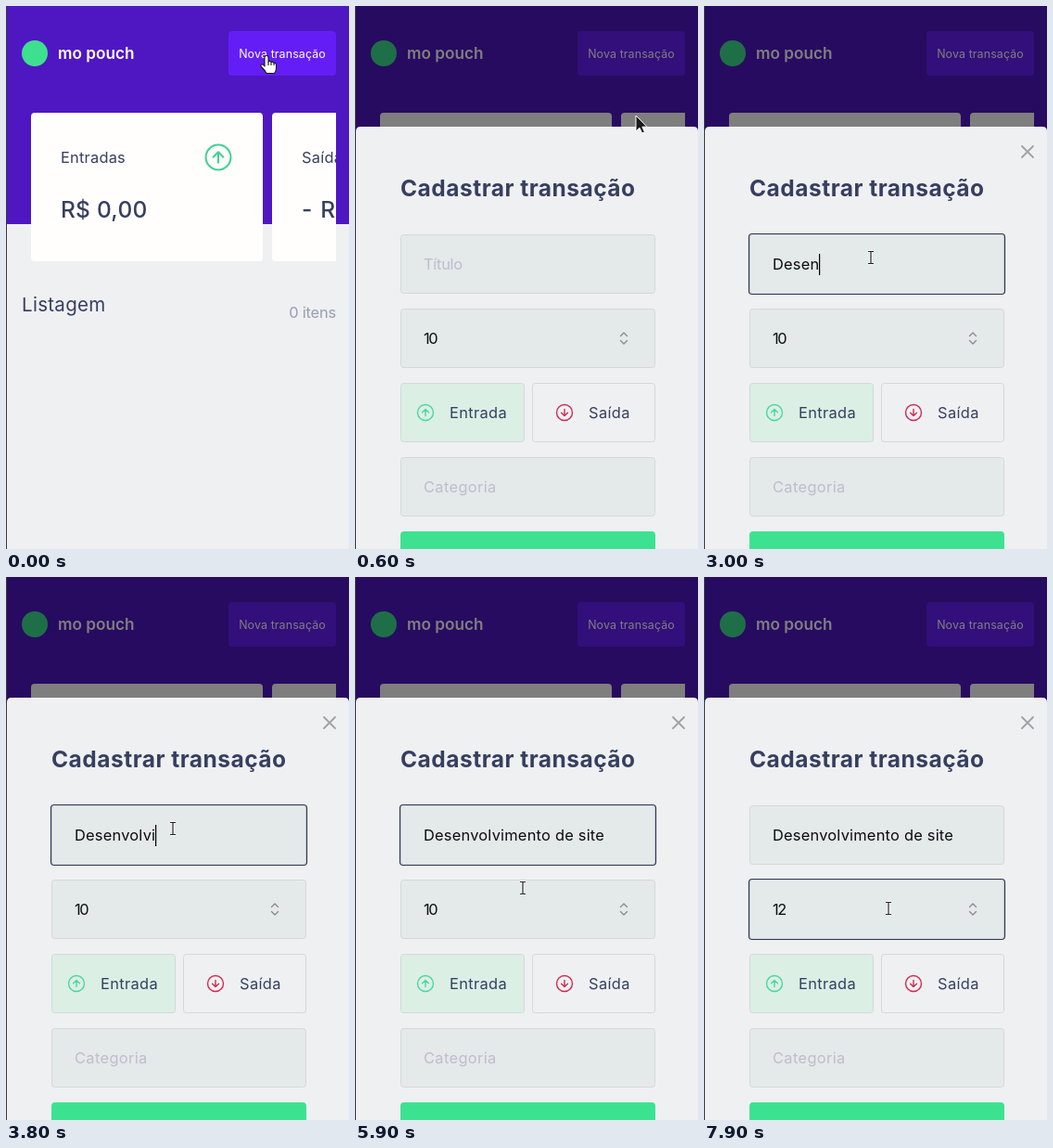
Animation, 370 px wide and 585 px high, one loop 8 s. Source, as an HTML page:

```html
<!DOCTYPE html>
<html lang="pt">
<head>
<meta charset="utf-8">
<title>Nova transação</title>
<style>
  html, body { margin: 0; width: 100%; height: 100%; overflow: hidden; background: #eff0f2; }
  svg { display: block; }
  text { font: 16.4px Inter, "Open Sans", sans-serif; letter-spacing: .014em; fill: #363f5f; white-space: pre; }
  .brand { font-size: 17.2px; font-weight: 600; letter-spacing: 0; fill: #fff; }
  .action { font-size: 12.4px; letter-spacing: .01em; fill: #fff; }
  .amount { font-size: 24.5px; font-weight: 500; letter-spacing: .01em; }
  .heading { font-size: 20.5px; letter-spacing: .014em; }
  .title { font-size: 24.5px; font-weight: 700; letter-spacing: .02em; }
  .option { letter-spacing: .022em; }
  .count { fill: #969cb2; letter-spacing: -.01em; }
  .hint { fill: #bdbdcd; }
  .entry { fill: #0c0c10; }
  #hint { letter-spacing: -.015em; }
  #number { letter-spacing: -.09em; }
  .field { fill: #e4e9ea; stroke: #d4d8d9; }
  .focus { fill: none; stroke: #2f3857; stroke-width: 1.2; }
  .line { fill: none; stroke-linecap: round; stroke-linejoin: round; }
</style>
</head>
<body>
<svg width="370" height="585" viewBox="0 0 370 585">
  <defs>
    <clipPath id="row"><path d="M0 100H356V290H0z"/></clipPath>
    <g id="up" class="line"><circle r="8.5"/><path d="M0 3.6V-3.6M-3.4-.2 0-3.6 3.4-.2"/></g>
  </defs>

  <path fill="#eff0f2" d="M0 0H370V585H0z"/>
  <path fill="#4f17c2" d="M0 0H370V235H0z"/>
  <circle cx="31" cy="51" r="14" fill="#3de08f"/>
  <text class="brand" x="56" y="57">mo pouch</text>
  <rect x="240" y="27" width="116" height="48" rx="4" fill="#641ef5"/>
  <text class="action" x="298" y="56" text-anchor="middle">Nova transação</text>
  <rect id="shade" x="240" y="27" width="116" height="48" rx="4" fill="#200080"/>

  <g clip-path="url(#row)">
    <rect x="27" y="115" width="250" height="160" rx="4" fill="#fffefd"/>
    <rect x="287" y="115" width="250" height="160" rx="4" fill="#fffefd"/>
    <text x="59" y="169">Entradas</text>
    <text x="319" y="169">Saídas</text>
    <text class="amount" x="59" y="228">R$ 0,00</text>
    <text class="amount" x="319" y="228" word-spacing="2">- R$ 0,00</text>
    <use href="#up" transform="translate(229 163) scale(1.58)" stroke="#44cf97" stroke-width="1.3"/>
  </g>
  <text class="heading" x="17" y="329">Listagem</text>
  <text class="count" x="356" y="336" text-anchor="end">0 itens</text>

  <g id="modal">
    <path fill="#000" opacity=".5" d="M0 0H370V585H0z"/>
    <path fill="#eff0f2" d="M1 585V135q0-5 5-5H365q5 0 5 5V585z"/>
    <path id="close" class="line" d="M343 151l12 12m0-12l-12 12" stroke="#a0a1a6" stroke-width="1.8"/>
    <text class="title" x="49" y="205">Cadastrar transação</text>

    <rect class="field" x="49.5" y="246.5" width="274" height="63" rx="3"/>
    <rect class="field" x="49.5" y="326.5" width="274" height="63" rx="3"/>
    <rect class="field" x="49.5" y="406.5" width="133" height="63" rx="3" style="fill:#dbefe5"/>
    <rect class="field" x="191.5" y="406.5" width="132" height="63" rx="3" style="fill:none"/>
    <rect class="field" x="49.5" y="486.5" width="274" height="63" rx="3"/>
    <rect x="49" y="566" width="275" height="64" rx="4" fill="#3de291"/>

    <text id="hint" class="hint" x="74" y="284">Título</text>
    <text id="name" class="entry" x="74" y="284"></text>
    <text id="number" class="entry" x="74" y="364">10</text>
    <path class="line" d="M286.5 355.5l3.5-3.5 3.5 3.5m-7 5l3.5 3.5 3.5-3.5" stroke="#8b8c93" stroke-width="1.4"/>
    <use href="#up" transform="translate(76 438)" stroke="#4ad79c" stroke-width="1.4"/>
    <use href="#up" transform="translate(226 438) scale(1 -1)" stroke="#cc2c52" stroke-width="1.4"/>
    <text class="option" x="102" y="444">Entrada</text>
    <text class="option" x="252" y="444">Saída</text>
    <text class="hint option" x="74" y="524">Categoria</text>
    <rect id="focus" class="focus" x="48.5" width="276" height="65" rx="3.5"/>
    <rect id="caret" width="1.2" height="23" fill="#000"/>
  </g>

  <path fill="#38383e" d="M0 0H1V585H0z"/>

  <g id="hand" fill="#fff" stroke="#15151c" stroke-width="1.1" stroke-linejoin="round">
    <path d="M-2 11V1.5Q-2-.5 0-.5T2 1.5V6Q4 4.7 5 6.5 7 5.5 8 7.5 10.5 7 10.5 9.5V13Q10.5 16 8.5 18.5H0Q-2 15-5.5 11.5-7 9.5-5 8.8-3.5 9-2 11z"/>
    <path fill="none" d="M2 6v4M5 6.5v3.5M8 7.5v2.5"/>
  </g>
  <path id="arrow" d="M0 0V17L4 13.3 6.6 19 9.4 17.8 6.9 12.2H12z" fill="#1a1a1a" stroke="#fff" stroke-width="1"/>
  <g id="beam" fill="none">
    <path d="M-3-6.5H3M0-6.5V6.5M-3 6.5H3" stroke="#fff" stroke-width="3"/>
    <path d="M-3-6.5H3M0-6.5V6.5M-3 6.5H3" stroke="#222" stroke-width="1.2"/>
  </g>
</svg>
<script>
const LOOP = 8000, STEP = 100;
const $ = id => document.getElementById(id);
const show = (id, on) => $(id).style.display = on ? '' : 'none';

// Bursts of keys: start time and the letters typed, one per step
const keys = [[2000, 'D'], [2200, 'e'], [2400, 'se'], [3000, 'n'], [3200, 'vo'], [3600, 'lvi'],
  [4000, 'mento'], [4600, ' de '], [5200, 'sit'], [5400, 'e']];

// Pointer stops: time, x, y, shape
const stops = [
  [0, 281, 54, 'hand'],
  [600, 303, 118, 'arrow'], [700, 287, 148, 'arrow'], [800, 258, 192, 'arrow'],
  [900, 222, 236, 'arrow'], [1000, 194, 260, 'beam'], [1100, 180, 271, 'beam'],
  [5900, 181, 335, 'beam'], [6000, 184, 378, 'beam'],
  [6200, 178, 362, 'beam'], [6300, 171, 350, 'beam'], [6400, 167, 340, 'beam'],
  [6700, 191, 358, 'beam'], [6800, 240, 364, 'beam'], [6900, 283, 366, 'beam'],
  [7100, 296, 353, 'arrow'], [7200, 290, 351, 'arrow'],
  [7700, 277, 360, 'beam'], [7800, 232, 361, 'beam'], [7900, 199, 357, 'beam']
];

function draw(t) {
  const open = t >= 600;
  show('modal', open);
  $('shade').setAttribute('opacity', open ? 0 : Math.min(4, Math.floor(t / STEP)) * .045);
  show('close', t >= 700);

  const typed = keys.map(([start, text]) =>
    text.slice(0, Math.max(0, Math.floor((t - start) / STEP) + 1))).join('');
  $('name').textContent = typed;
  $('number').textContent = t < 7200 ? 10 : t < 7600 ? 11 : 12;
  show('hint', !typed);

  const second = t >= 6200;
  show('focus', t >= 1200);
  $('focus').setAttribute('y', second ? 325.5 : 245.5);
  show('caret', t >= 1200 && t < 5900 || second && t < 7100);
  if (open) {
    const width = $(second ? 'number' : 'name').getComputedTextLength();
    $('caret').setAttribute('x', 74 + Math.round(width));
    $('caret').setAttribute('y', second ? 347 : 267);
  }

  const [, x, y, shape] = stops.findLast(stop => stop[0] <= t);
  for (const id of ['hand', 'arrow', 'beam']) show(id, id === shape);
  $(shape).setAttribute('transform', `translate(${x} ${y})`);
}

function tick() {
  draw(performance.now() % LOOP);
  requestAnimationFrame(tick);
}
tick();
</script>
</body>
</html>
```
